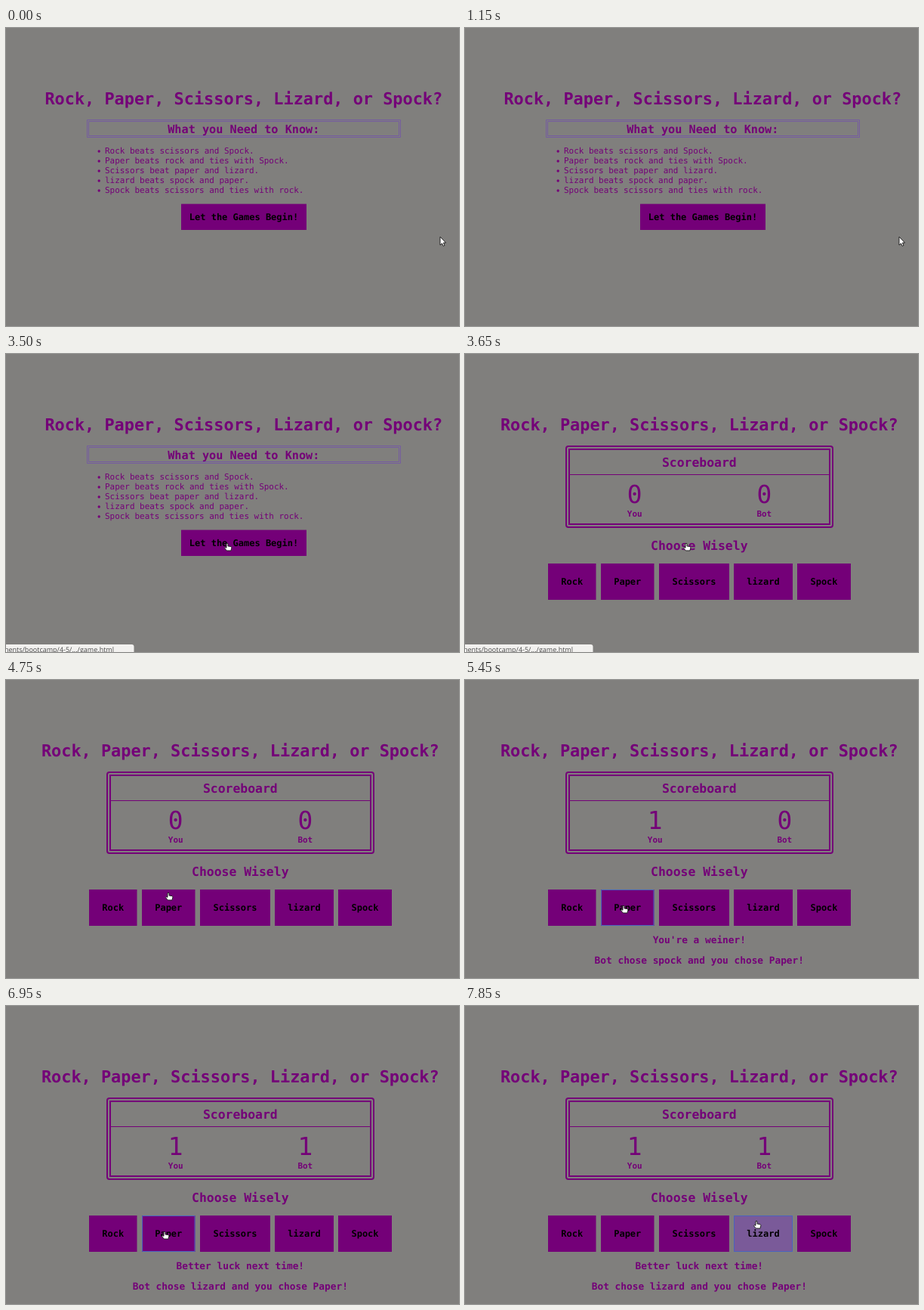
Animation, 600 px wide and 394 px high, one loop 8 s. Source, as an HTML page with a canvas:

```html
<!DOCTYPE html>
<html lang="en">
<head>
<meta charset="utf-8">
<title>Rock, Paper, Scissors, Lizard, or Spock?</title>
<style>
  html, body { margin: 0; width: 100%; height: 100%; overflow: hidden; background: #807f7d; }
  canvas { display: block; }
</style>
</head>
<body>
<canvas id="stage" width="600" height="394"></canvas>
<script>
const ctx = document.getElementById('stage').getContext('2d');
ctx.textRendering = 'geometricPrecision';
const LOOP = 8000, STEP = 50;
const GRAY = '#807f7d', PURPLE = '#740078', LILAC = '#7a5a99', EDGE = '#755ca0', FOCUS = '#4a62c0';
const MONO = '"DejaVu Sans Mono", monospace';

// Font sizes: the page is shown at 68.4 % zoom
const ZOOM = .684;
const BODY = 16 * ZOOM, TITLE = 32 * ZOOM, HEADING = 24 * ZOOM, DIGIT = 48 * ZOOM, RESULT = 18.72 * ZOOM;

// Moments in ms
const GAME_OPENS = 3550, LINK_LEAVES = 4000, FIRST_PRESS = 5300, FIRST_RESULT = 5450,
      SECOND_PRESS = 6750, SECOND_RESULT = 6800, LAST_PRESS = 7850;

const NAME = 'Rock, Paper, Scissors, Lizard, or Spock?';
const RULES = [
  'Rock beats scissors and Spock.',
  'Paper beats rock and ties with Spock.',
  'Scissors beat paper and lizard.',
  'lizard beats spock and paper.',
  'Spock beats scissors and ties with rock.'
];
const START = { label: 'Let the Games Begin!', x: 232, y: 232.6, w: 166, h: 34.4 };
const CHOICES = [['Rock', 110, 63.5], ['Paper', 180, 70.5], ['Scissors', 257, 93],
                 ['lizard', 356, 78], ['Spock', 440, 71]]
  .map(([label, x, w]) => ({ label, x, y: 277, w, h: 48 }));

// Pointer path: time, x, y
const PATH = [
  [0, 575, 276], [1850, 575, 276], [1950, 452, 240], [2050, 336, 214], [2200, 308, 231], [2450, 293, 250],
  [4350, 293, 250], [4550, 252, 264], [4750, 215, 281], [5050, 210, 298],
  [7300, 210, 298], [7550, 300, 292], [7850, 386, 284], [LOOP, 386, 284]
];

function pointerAt(t) {
  const i = Math.max(1, PATH.findIndex(p => p[0] > t));
  const [t0, x0, y0] = PATH[i - 1], [t1, x1, y1] = PATH[i];
  const k = (t - t0) / (t1 - t0);
  return { x: x0 + (x1 - x0) * k, y: y0 + (y1 - y0) * k };
}

const inside = (p, b) => p.x >= b.x && p.x <= b.x + b.w && p.y >= b.y && p.y <= b.y + b.h;

function text(str, x, y, size, { weight = 'bold', align = 'center', color = PURPLE, family = MONO } = {}) {
  ctx.font = `${weight} ${size}px ${family}`;
  ctx.textAlign = align;
  ctx.fillStyle = color;
  ctx.fillText(str, x, y);
}

function frame(x, y, w, h, color, width, radius = 0) {
  ctx.strokeStyle = color;
  ctx.lineWidth = width;
  ctx.beginPath();
  ctx.roundRect(x, y, w, h, radius);
  ctx.stroke();
}

function button({ label, x, y, w, h }, pressed, focused) {
  ctx.fillStyle = pressed ? LILAC : PURPLE;
  ctx.fillRect(x, y, w, h);
  if (focused) frame(x + .5, y + .5, w - 1, h - 1, FOCUS, 1);
  text(label, x + w / 2, y + h / 2 + 4, 12, { color: '#000' });
}

function drawIntro() {
  text(NAME, 314.8, 101, TITLE);
  frame(107.5, 121.5, 415, 23, EDGE, 1);
  frame(109.5, 123.5, 411, 19, EDGE, 1);
  text('What you Need to Know:', 314.8, 138.5, 15.2);
  RULES.forEach((rule, i) => {
    const y = 166 + 13 * i;
    ctx.fillStyle = PURPLE;
    ctx.beginPath();
    ctx.arc(123.2, y - 3, 1.7, 0, 7);
    ctx.fill();
    text(rule, 131, y, BODY, { weight: 'normal', align: 'left' });
  });
  button(START);
}

function score(points, name, x) {
  text(points, x, 196.5, DIGIT, { weight: 'normal' });
  text(name, x, 215, BODY);
}

function drawGame(t) {
  const won = t >= FIRST_RESULT, lost = t >= SECOND_RESULT;
  const shift = won && !lost ? 27 : 0;

  text(NAME, 310.3, 101, TITLE);
  frame(134, 122, 353, 107, PURPLE, 2, 3);
  frame(138, 126, 345, 99, PURPLE, 2);
  ctx.fillStyle = PURPLE;
  ctx.fillRect(139, 159, 343, 1);
  text('Scoreboard', 310.3, 148.5, HEADING);
  score(won ? 1 : 0, 'You', 224.7 + shift);
  score(lost ? 1 : 0, 'Bot', 396.3 + shift);
  text('Choose Wisely', 310.3, 259, HEADING);

  const paperDown = (t >= FIRST_PRESS && !won) || (t >= SECOND_PRESS && !lost);
  const lizardDown = t >= LAST_PRESS;
  for (const choice of CHOICES) {
    const paper = choice.label === 'Paper', lizard = choice.label === 'lizard';
    button(choice, (paper && paperDown) || (lizard && lizardDown),
      (paper && t >= FIRST_PRESS && !lizardDown) || (lizard && lizardDown));
  }
  if (won) {
    text(lost ? 'Better luck next time!' : "You're a weiner!", 310.3, 348, RESULT);
    text(`Bot chose ${lost ? 'lizard' : 'spock'} and you chose Paper!`, 310.3, 375, RESULT);
  }
}

function drawStatus() {
  ctx.fillStyle = '#f2f1ef';
  ctx.beginPath();
  ctx.roundRect(-5, 384, 174.5, 20, 3);
  ctx.fill();
  text('Documents/bootcamp/4-5/.../game.html', 143, 393.5, 9,
    { weight: 'normal', align: 'right', color: '#4c4c4c', family: '"Open Sans", sans-serif' });
}

const ARROW = new Path2D('M0 0V11L2.5 8.8L4.2 12.3L6 11.4L4.4 8H7.6Z');
const HAND = new Path2D('M-1 .8Q0 -.6 1 .8V4L5 4.6Q6 5 5.8 6.5L5 10H-.6L-3.6 6.6Q-3.6 5 -1 6.2Z');

function drawPointer({ x, y }, hand) {
  ctx.save();
  ctx.translate(x, y);
  ctx.fillStyle = '#fff';
  ctx.strokeStyle = '#222';
  ctx.lineWidth = 1;
  const shape = hand ? HAND : ARROW;
  ctx.fill(shape);
  ctx.stroke(shape);
  ctx.restore();
}

function draw(now) {
  const t = Math.floor(now % LOOP / STEP) * STEP;
  const pointer = pointerAt(t);
  const onLink = t < LINK_LEAVES && inside(pointer, START);

  ctx.fillStyle = GRAY;
  ctx.fillRect(0, 0, 600, 394);
  if (t < GAME_OPENS) drawIntro();
  else drawGame(t);
  if (onLink) drawStatus();
  drawPointer(pointer, onLink || (t >= GAME_OPENS && CHOICES.some(c => inside(pointer, c))));
}

const began = performance.now();
function tick() {
  draw(performance.now() - began);
  requestAnimationFrame(tick);
}
tick();
</script>
</body>
</html>
```
